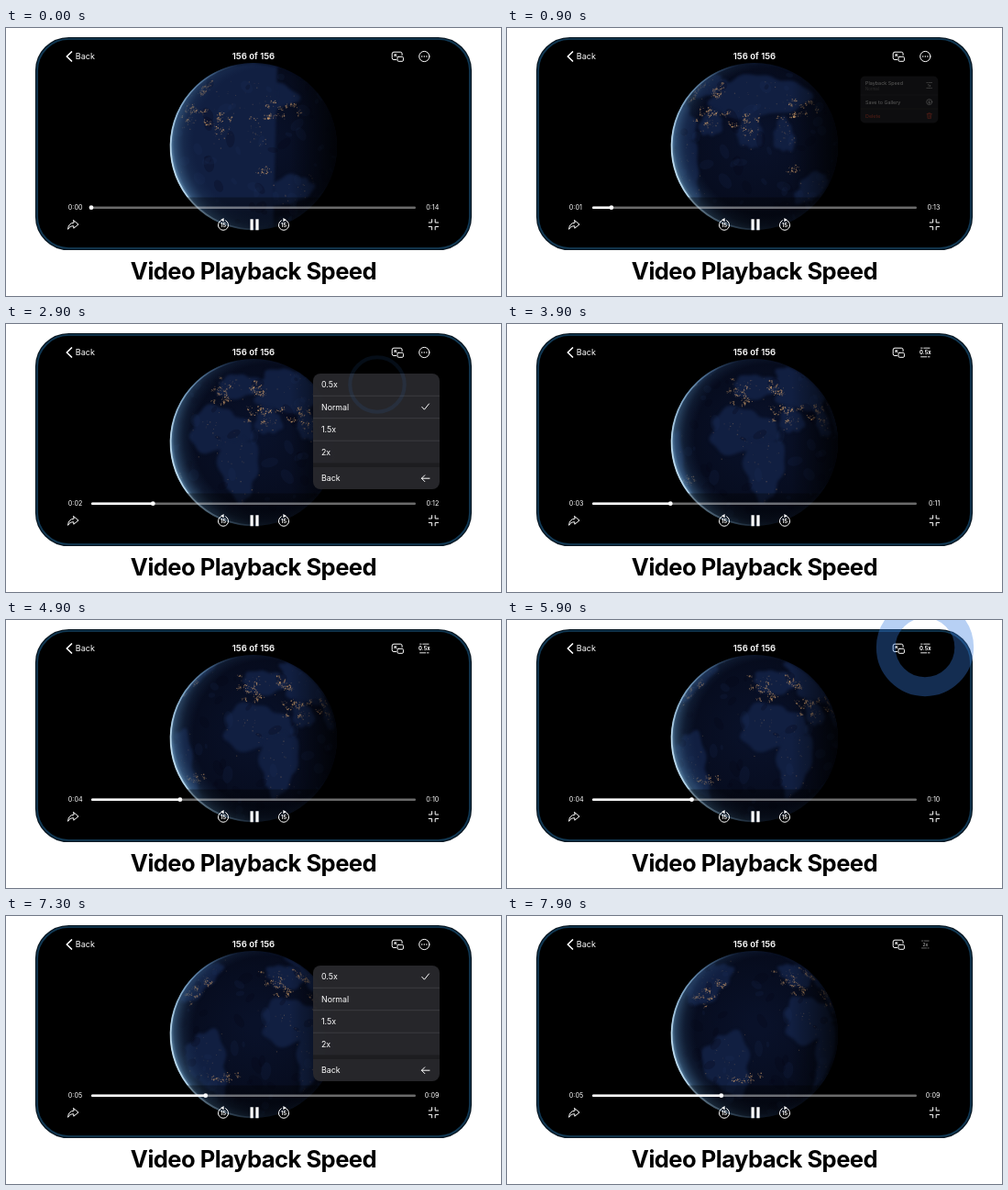
An HTML page with a canvas for the animation above (8 s loop, 540 by 292 pixels).

```html
<!DOCTYPE html>
<html lang="en">
<head>
<meta charset="utf-8">
<title>Video Playback Speed</title>
<style>
  html, body { margin: 0; width: 100%; height: 100%; overflow: hidden; background: #fff; }
  canvas, svg { position: absolute; left: 0; top: 0; width: 540px; height: 292px; }
  text { font-family: Inter, Roboto, sans-serif; fill: #fff; }
  .title { font-size: 25.6px; font-weight: 700; letter-spacing: -.55px; fill: #000; }
  .bar { font-size: 9.1px; }
  .count { font-size: 9.6px; font-weight: 600; }
  .time { font-size: 7.2px; }
  .item { font-size: 8.8px; }
  .note { font-size: 7px; fill: #77777c; }
  .red { fill: #e8513d; }
  .tiny { font-size: 5.8px; font-weight: 700; }
  .line { fill: none; stroke: #fff; stroke-width: 1; stroke-linecap: round; stroke-linejoin: round; }
  .rule { stroke: #4a4a4f; stroke-width: .6; }
  .mid { text-anchor: middle; }
  .end { text-anchor: end; }
</style>
</head>
<body>
<canvas id="globe" width="540" height="292"></canvas>
<svg viewBox="0 0 540 292">
  <defs>
    <linearGradient id="shade" x1="0" y1="0" x2="0" y2="1">
      <stop offset="0" stop-color="#000" stop-opacity=".35"/>
      <stop offset="1" stop-color="#000" stop-opacity=".6"/>
    </linearGradient>
    <clipPath id="panelClip"><rect id="panelMask" x="335" y="54" width="138" height="83" rx="8"/></clipPath>
    <g id="skip">
      <path class="line" d="M-2.6-4.9A5.6 5.6 0 1 0 2.6-4.9"/>
      <path d="M-.6-7.6L2.8-5.5L-.6-3.4Z" fill="#fff"/>
    </g>
    <path id="dashes" class="line" style="stroke-width:.9" d="M-4.7-4.8h1.5M-1.5-4.8h6.2M-4.7 4.8h6.2M3.2 4.8h1.5"/>
  </defs>

  <rect x="33.5" y="11.5" width="473" height="229" rx="35" fill="none" stroke="#081722" stroke-width="3.2"/>
  <rect x="34" y="12" width="472" height="228" rx="34.5" fill="none" stroke="#123a56" stroke-width="1.6"/>
  <rect x="80" y="184.5" width="380" height="54" fill="url(#shade)"/>

  <path class="line" style="stroke-width:1.7" d="M71.5 26L66.3 31L71.5 36"/>
  <text class="bar" x="75.8" y="34.2">Back</text>
  <text class="count mid" x="270" y="34.4">156 of 156</text>

  <g class="line">
    <path d="M425.5 34.5H423Q421.2 34.5 421.2 32.7V28Q421.2 26.2 423 26.2H430.3Q432.1 26.2 432.1 28V29.4"/>
    <rect x="427" y="31.3" width="6.4" height="5" rx="1.2"/>
    <path d="M424 29l2.3 2M424 30.8v-1.9h2"/>
  </g>
  <g id="dots">
    <circle class="line" cx="456.3" cy="31" r="5.6"/>
    <path d="M453.7 31h.01M456.3 31h.01M458.9 31h.01" stroke="#fff" stroke-width="1.5" stroke-linecap="round"/>
  </g>
  <g id="speed">
    <use href="#dashes"/>
    <text id="speedText" class="tiny mid" y="2.1"></text>
  </g>

  <text id="passed" class="time" x="67.8" y="198.4"></text>
  <text id="left" class="time end" x="472.4" y="198.4"></text>
  <rect x="93" y="194.4" width="354" height="2.6" rx="1.3" fill="#fff" opacity=".42"/>
  <rect id="fill" x="93" y="194.4" height="2.6" rx="1.3" fill="#fff"/>
  <circle id="knob" cy="195.7" r="2.4" fill="#fff"/>

  <path class="line" d="M73.8 209.6L79 214L73.8 218.2V215.8Q69.5 215.5 67.6 219.3Q68 212.6 73.8 212.1Z"/>
  <use href="#skip" transform="translate(237 214.6) scale(-1 1)"/>
  <use href="#skip" transform="translate(303 214.6)"/>
  <text class="tiny mid" x="237" y="216.8">15</text>
  <text class="tiny mid" x="303" y="216.8">15</text>
  <path d="M266.5 208.3h3.2v12h-3.2zM272.4 208.3h3.2v12h-3.2z" fill="#fff"/>
  <path class="line" d="M461.2 212h3.4v-3.4M471.6 212h-3.4v-3.4M461.2 216.4h3.4v3.4M471.6 216.4h-3.4v3.4"/>

  <g id="menu">
    <rect id="panel" x="335" y="54" width="138" height="83" rx="8" fill="#29292d" fill-opacity=".95"/>
    <g clip-path="url(#panelClip)">
      <g id="main">
        <path class="rule" d="M335 87.5H473M335 112H473"/>
        <text class="item" x="344" y="69">Playback Speed</text>
        <text id="rate" class="note" x="344" y="79.3"></text>
        <text class="item" x="344" y="103.2">Save to Gallery</text>
        <text class="item red" x="344" y="127.3">Delete</text>
        <use href="#dashes" x="457.4" y="70.3"/>
        <text id="rateIcon" class="tiny mid" x="457.4" y="72.4" style="font-weight:500"></text>
        <g class="line">
          <circle cx="457.4" cy="99.8" r="4.9"/>
          <path d="M457.4 97.2v5M455.3 100.2l2.1 2l2.1-2"/>
        </g>
        <path class="line" style="stroke:#e8513d" d="M453 121h8.8M455.8 121v-1.6h3.2v1.6M454 121l.6 8h5.6l.6-8M456.2 123.2v3.8M458.6 123.2v3.8"/>
      </g>
      <g id="speeds">
        <path class="rule" d="M335 78.3H473M335 102.7H473M335 127.2H473"/>
        <rect x="335" y="151.4" width="138" height="4.6" fill="#1d1d20"/>
        <text class="item" x="344" y="69.2">0.5x</text>
        <text class="item" x="344" y="93.6">Normal</text>
        <text class="item" x="344" y="118.2">1.5x</text>
        <text class="item" x="344" y="142.6">2x</text>
        <text class="item" x="344" y="171.2">Back</text>
        <path id="check" class="line" d="M453.8 .4l2.6 2.8l5-6.2"/>
        <path class="line" d="M462 168.2h-8.6M456.8 164.8l-3.4 3.4l3.4 3.4"/>
      </g>
    </g>
  </g>
  <circle id="ring" fill="none" stroke="#387ee0"/>
  <text class="title mid" x="270" y="274.4">Video Playback Speed</text>
</svg>

<script>
const LOOP = 8000;
const el = id => document.getElementById(id);
const ctx = el('globe').getContext('2d');
const CX = 270, CY = 129, R = 91, RAD = Math.PI / 180, TILT = 9 * RAD;

const clamp = (v, a, b) => Math.min(b, Math.max(a, v));
const ramp = (t, a, b) => { const u = clamp((t - a) / (b - a), 0, 1); return u * u * (3 - 2 * u); };
const set = (id, attrs) => Object.entries(attrs).forEach(([k, v]) => el(id).setAttribute(k, v));

let seed = 11;
const rnd = () => (seed = (seed * 16807) % 2147483647) / 2147483647;
const bell = () => rnd() + rnd() + rnd() - 1.5;

// Land masses as wobbly ellipses: longitude, latitude and the two radii.
const lands = [
  [8, 17, 25, 16], [25, -10, 14, 24], [20, 52, 28, 11], [90, 48, 55, 19], [79, 20, 9, 13],
  [47, 24, 10, 10], [104, 16, 8, 12], [134, -25, 20, 12], [-58, -14, 18, 24], [-95, 46, 32, 18]
];
// Bright regions: longitude, latitude, spread.
const hubs = [
  [77, 25, 9], [115, 33, 9], [137, 36, 4], [110, -7, 4], [7, 47, 11], [36, 49, 8],
  [33, 30, 4], [49, 29, 7], [-46, -22, 6], [-82, 38, 13]
];

const lights = [];
function scatter(lon, lat, w, h, count, glow) {
  for (let i = 0; i < count; i++) {
    lights.push({ lon: lon + bell() * w, lat: lat + bell() * h, size: .5 + rnd() * .9, glow: glow * (.25 + rnd() * .75) });
  }
}
for (const [lon, lat, s] of hubs) {
  for (let i = 0; i < s; i++) scatter(lon + bell() * s * 1.6, lat + bell() * s, 3, 2, 11, .7);
}
for (const [lon, lat, w, h] of lands) scatter(lon, lat, w, h, 25, .3);

const patches = Array.from({ length: 150 }, () => ({
  lon: rnd() * 360, lat: rnd() * 130 - 65, r: 3 + rnd() * 9, dark: rnd() < .5
}));

function project(lon, lat, mid) {
  const a = (lon - mid) * RAD, b = lat * RAD;
  const c = Math.cos(b) * Math.cos(a);
  return {
    x: Math.cos(b) * Math.sin(a),
    y: -(Math.sin(b) * Math.cos(TILT) - c * Math.sin(TILT)),
    z: Math.sin(b) * Math.sin(TILT) + c * Math.cos(TILT)
  };
}

function gradient(g, ...stops) {
  stops.forEach(([at, color]) => g.addColorStop(at, color));
  return g;
}

const ocean = gradient(ctx.createRadialGradient(275, 120, 10, CX, CY, R), [0, '#091129'], [1, '#060b1c']);
const night = gradient(ctx.createLinearGradient(310, 0, 362, 0), [0, 'rgba(0,0,0,0)'], [1, 'rgba(0,0,0,.75)']);
const air = gradient(ctx.createRadialGradient(285, 124, 80, 285, 124, 107),
  [0, 'rgba(30,55,90,0)'], [.4, 'rgba(40,70,105,.25)'], [.8, 'rgba(75,120,160,.55)'], [1, 'rgba(135,185,220,.85)']);
const rim = gradient(ctx.createLinearGradient(178, 150, 275, 125), [0, 'rgba(200,228,245,.95)'], [.35, 'rgba(150,195,230,.7)'], [1, 'rgba(90,140,190,0)']);

function drawLand([lon, lat, w, h], mid) {
  ctx.beginPath();
  for (let a = 0; a < 6.28; a += .12) {
    const k = 1 + .13 * Math.sin(3 * a + lon) + .07 * Math.sin(8 * a + lat);
    const p = project(lon + w * k * Math.cos(a), lat + h * k * Math.sin(a), mid);
    // Points behind the horizon slide to the edge of the disc.
    const size = p.z < 0 ? R / Math.hypot(p.x, p.y) : R;
    ctx.lineTo(CX + p.x * size, CY + p.y * size);
  }
  ctx.fill();
}

function drawGlobe(mid) {
  ctx.clearRect(0, 0, 540, 292);
  ctx.fillStyle = '#000';
  ctx.beginPath();
  ctx.roundRect(33, 11, 474, 230, 35);
  ctx.fill();

  ctx.save();
  ctx.beginPath();
  ctx.arc(CX, CY, R, 0, 7);
  ctx.clip();
  ctx.fillStyle = ocean;
  ctx.fillRect(170, 30, 200, 200);

  ctx.filter = 'blur(1.5px)';
  ctx.fillStyle = '#111f41';
  for (const land of lands) drawLand(land, mid);
  ctx.filter = 'none';

  for (const s of patches) {
    const p = project(s.lon, s.lat, mid);
    if (p.z < .1) continue;
    ctx.fillStyle = s.dark ? 'rgba(4,7,20,.25)' : 'rgba(34,56,104,.12)';
    ctx.beginPath();
    ctx.ellipse(CX + p.x * R, CY + p.y * R, s.r * p.z, s.r * .5, s.lon, 0, 7);
    ctx.fill();
  }
  for (const s of lights) {
    const p = project(s.lon, s.lat, mid);
    if (p.z < .08) continue;
    ctx.fillStyle = `rgba(232,176,116,${s.glow * Math.min(1, p.z * 1.3)})`;
    ctx.fillRect(CX + p.x * R, CY + p.y * R, s.size, s.size);
  }
  for (const layer of [night, air]) {
    ctx.fillStyle = layer;
    ctx.fillRect(170, 30, 200, 200);
  }
  ctx.restore();

  ctx.strokeStyle = rim;
  ctx.lineWidth = 1.8;
  ctx.beginPath();
  ctx.arc(CX, CY, R - .6, 1.5, 4.9);
  ctx.stroke();
}

// Taps: start time and centre.
const TAP = 390;
const taps = [[500, 456, 30], [1400, 405, 70], [2800, 405, 66], [5700, 456, 30], [6300, 405, 70], [7260, 405, 143]];

function drawTap(t) {
  const [at, x, y] = taps.find(([start]) => t >= start && t < start + TAP) || [t, 0, 0];
  const u = (t - at) / TAP;
  const outer = 68 * (1 - (1 - u) ** 2.1);
  const inner = Math.min(outer, 23 + 18 * u);
  set('ring', {
    cx: x, cy: y, r: (outer + inner) / 2, 'stroke-width': outer - inner,
    opacity: .36 * ramp(u, .13, .5) * (1 - ramp(u, .65, 1) * .9) * (u < .98)
  });
}

function drawMenu(t) {
  const again = t > 5000, late = t > 7000;
  const open = again ? ramp(t, 6000, 6220) - ramp(t, 7600, 7820) : ramp(t, 800, 1050) - ramp(t, 3080, 3330);
  const sub = again ? ramp(t, 6680, 6930) : ramp(t, 1750, 2000);
  const scale = .4 + .6 * open;
  set('menu', { opacity: open, transform: `translate(${466 * (1 - scale)} ${50 * (1 - scale)}) scale(${scale})` });
  for (const id of ['panel', 'panelMask']) set(id, { height: 83 + 43 * sub });
  set('main', { opacity: 1 - sub });
  set('speeds', { opacity: sub });
  set('check', { transform: `translate(0 ${again ? 66 : 90})` });
  el('rate').textContent = again ? '0.5x' : 'Normal';
  el('rateIcon').textContent = again ? '0.5x' : '1x';

  const dots = 1 - ramp(t, 3250, 3480) + ramp(t, 5980, 6150) - ramp(t, 7620, 7780);
  const speed = late ? ramp(t, 7700, 8080) : ramp(t, 3350, 3720) - ramp(t, 5980, 6120);
  set('dots', { opacity: dots });
  set('speed', { opacity: speed, transform: `translate(456.3 31) scale(${.6 + .4 * speed})` });
  el('speedText').textContent = late ? '2x' : '0.5x';
}

function drawPlayer(t) {
  // Normal speed, then half, then double.
  const played = t - .5 * Math.max(0, t - 3450) + 1.5 * Math.max(0, t - 7640);
  const pos = played * .000951;
  const sec = Math.floor(pos + .225);
  const width = pos * 24.4;
  set('fill', { width });
  set('knob', { cx: 93 + width });
  el('passed').textContent = '0:0' + sec;
  el('left').textContent = '0:' + String(14 - sec).padStart(2, '0');
  drawGlobe(103 - 24.4 * pos);
}

function frame() {
  const t = performance.now() % LOOP;
  drawPlayer(t);
  drawMenu(t);
  drawTap(t);
  requestAnimationFrame(frame);
}
frame();
</script>
</body>
</html>
```
